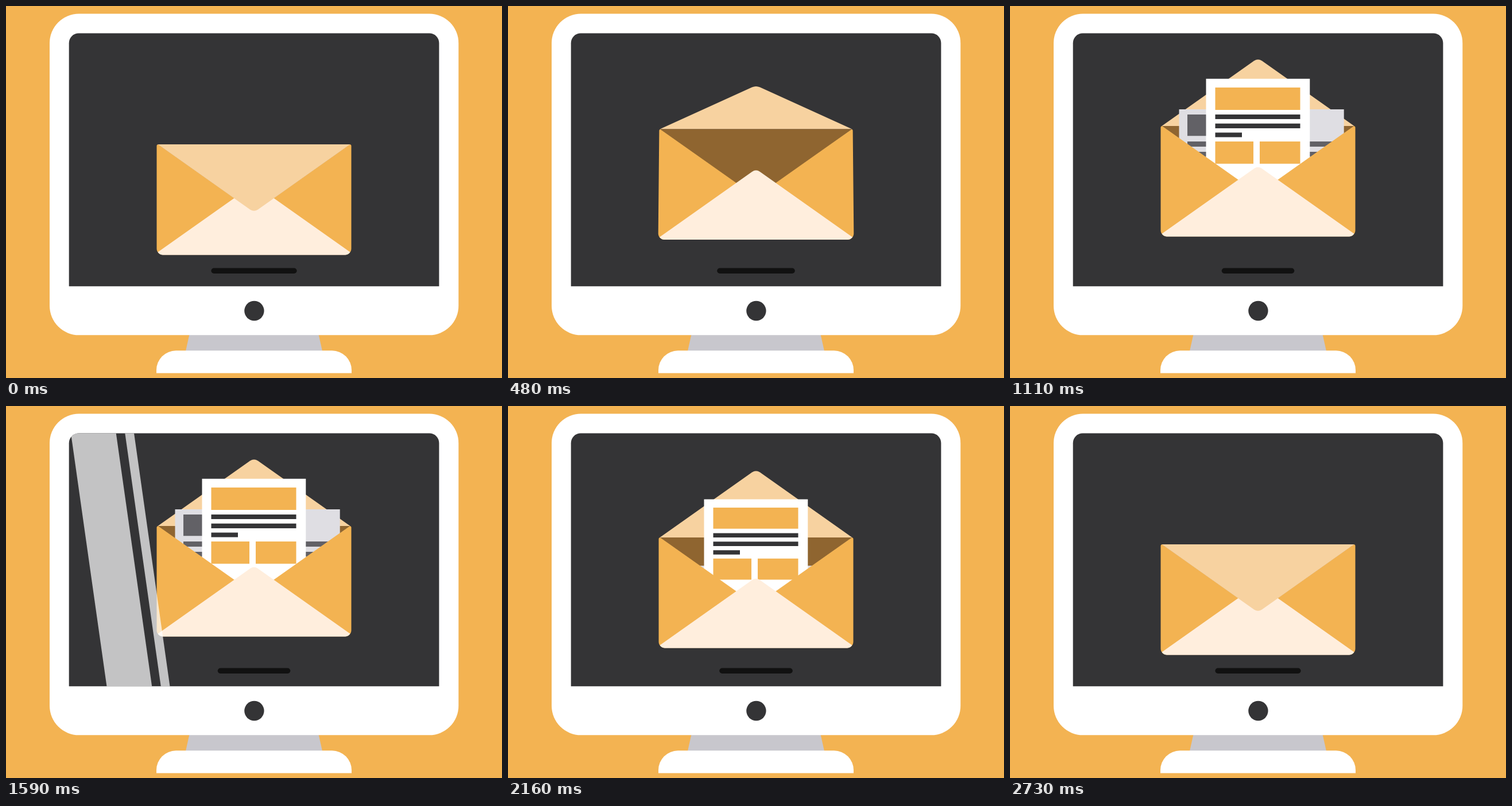
Recreate the animation shown at these times as an HTML page with a canvas. Size 864 px wide and 648 px high, loop 3.18 s.

```html
<!DOCTYPE html>
<html lang="en">
<head>
<meta charset="utf-8">
<title>Mail on a desktop screen</title>
<style>
  html, body { margin: 0; width: 100%; height: 100%; overflow: hidden; background: #f3b352; }
  canvas { display: block; width: 100vw; height: 100vh; }
</style>
</head>
<body>
<canvas id="stage" width="864" height="648"></canvas>
<script>
const ctx = document.getElementById('stage').getContext('2d');
const LOOP = 3180, STEP = 30;
const CX = 432, HALF = 169.5, BODY = 192.5, SLOPE = 0.707;
const GOLD = '#f3b352', DARK = '#343436', FLAP = '#f7d2a0', CREAM = '#ffeedd',
      BROWN = '#8f6530', PAPER = '#dfdee3', GREY = '#626166';

const clamp = v => Math.min(1, Math.max(0, v));
const span = (t, a, b) => clamp((t - a) / (b - a));
const sine = u => (1 - Math.cos(Math.PI * u)) / 2;
const ease = (t, a, b) => sine(span(t, a, b));
const mix = (a, b, u) => a + (b - a) * u;
const backOut = u => 1 + 1.8 * (u - 1) ** 3 + 0.8 * (u - 1) ** 2;

function box(color, x1, y1, x2, y2, radii = 0) {
  ctx.fillStyle = color;
  ctx.beginPath();
  ctx.roundRect(x1, y1, x2 - x1, y2 - y1, radii);
  ctx.fill();
}

function poly(color, points) {
  ctx.fillStyle = color;
  ctx.beginPath();
  points.forEach(([x, y]) => ctx.lineTo(x, y));
  ctx.closePath();
  ctx.fill();
}

// Triangle on a base line with a rounded tip in the middle
function tipped(color, half, base, tip) {
  ctx.fillStyle = color;
  ctx.beginPath();
  ctx.moveTo(CX - half, base);
  ctx.arcTo(CX, tip, CX + half, base, 12);
  ctx.lineTo(CX + half, base);
  ctx.closePath();
  ctx.fill();
}

function drawMonitor() {
  box(GOLD, 0, 0, 864, 648);
  poly('#c8c7cd', [[319.5, 572], [544.5, 572], [551, 601], [313, 601]]);
  box('#fff', 262, 600.3, 602, 639.5, [34, 34, 0, 0]);
  box('#fff', 76, 13.5, 788.3, 573.3, 51);
  box(DARK, 109.7, 47.5, 754.4, 488.3, [17, 17, 0, 0]);
  ctx.fillStyle = DARK;
  ctx.beginPath();
  ctx.arc(432.4, 531, 17.2, 0, 7);
  ctx.fill();
}

// The sheets stretch upward from a line near the envelope's bottom
function sheet(scale, draw) {
  if (scale <= 0.05) return;
  const foot = 208;
  ctx.save();
  ctx.beginPath();
  ctx.rect(CX - 160, -200, 320, 380);
  ctx.clip();
  ctx.translate(0, foot);
  ctx.scale(1, scale);
  ctx.translate(0, -foot);
  draw();
  ctx.restore();
}

function backSheet() {
  box(PAPER, 294.5, -29, 581.7, 208);
  box(GREY, 309, -20, 380, 17.3);
  box(GREY, 309, 27, 567, 36);
  box(GREY, 309, 45, 567, 53.5);
}

function frontSheet() {
  box('#fff', 341.5, -82.3, 522.3, 208);
  box(GOLD, 357.5, -67, 505.5, -28);
  box(DARK, 357.5, -20, 505.5, -12);
  box(DARK, 357.5, -4.3, 505.5, 3.9);
  box(DARK, 357.5, 11.5, 404, 19.4);
  box(GOLD, 357.5, 27, 424, 65.7);
  box(GOLD, 435, 27, 505.5, 65.7);
}

function bodyPath(tilt) {
  const top = HALF - tilt, low = HALF + tilt;
  ctx.beginPath();
  ctx.moveTo(CX, 0);
  ctx.arcTo(CX + top, 0, CX + low, BODY, 3);
  ctx.arcTo(CX + low, BODY, CX, BODY, 11);
  ctx.arcTo(CX - low, BODY, CX - top, 0, 11);
  ctx.arcTo(CX - top, 0, CX, 0, 3);
  ctx.closePath();
}

function drawFlap(scale) {
  ctx.save();
  ctx.scale(1, scale);
  tipped(FLAP, 167.5, 0, 118.3);
  ctx.restore();
}

function drawEnvelope(pose) {
  const flap = 1 - 2 * pose.open;
  ctx.save();
  ctx.translate(0, pose.top);
  if (flap < 0) drawFlap(flap);
  poly(BROWN, [[CX - 167, 0], [CX + 167, 0], [CX + 24, 102], [CX - 24, 102]]);
  sheet(pose.back, backSheet);
  sheet(pose.front, frontSheet);

  ctx.save();
  bodyPath(pose.tilt);
  ctx.clip();
  const reach = 167 * SLOPE;
  for (const side of [-1, 1]) {
    poly(GOLD, [[CX + side * 180, 0], [CX + side * 167, 0], [CX, reach],
                [CX, BODY], [CX + side * 180, BODY]]);
  }
  tipped(CREAM, 190, 69.3 + 190 * SLOPE, 69.3);
  ctx.fillStyle = CREAM;
  ctx.fillRect(CX - 174, 69.3 + 174 * SLOPE, 348, 20);
  ctx.restore();

  if (flap > 0) drawFlap(flap);
  ctx.restore();
}

// Short strokes that shoot out beside the opening
function drawSparks(t) {
  const head = ease(t, 780, 960), tail = ease(t, 900, 1110);
  if (head <= tail) return;
  ctx.strokeStyle = FLAP;
  ctx.lineWidth = 3;
  ctx.lineCap = 'round';
  for (const [x, y, endY] of [[246, 200, 183], [246, 210, 210]]) {
    for (const flip of [x => x, x => 874 - x]) {
      ctx.beginPath();
      ctx.moveTo(flip(mix(x, 204, tail)), mix(y, endY, tail));
      ctx.lineTo(flip(mix(x, 204, head)), mix(y, endY, head));
      ctx.stroke();
    }
  }
}

function drawGlare(t) {
  if (t <= 1440 || t >= 1950) return;
  const x = mix(-65, 831, ease(t, 1440, 1950));
  ctx.save();
  ctx.beginPath();
  ctx.roundRect(109.7, 47.5, 644.7, 440.8, [17, 17, 0, 0]);
  ctx.clip();
  for (const [a, b] of [[0, 78.7], [94.3, 110]]) {
    poly('rgba(255,255,255,0.705)',
      [[x + a, 47.5], [x + b, 47.5], [x + b + 62.5, 488.5], [x + a + 62.5, 488.5]]);
  }
  ctx.restore();
}

function openAmount(t) {
  if (t < 540) {
    const u = span(t, 290, 540);
    return 1.025 * mix(u, sine(u), 0.4);
  }
  if (t < 1400) return 1 + 0.025 * (1 - ease(t, 540, 660));
  return 1 - ease(t, 2370, 2670);
}

function poseAt(t) {
  const lift = ease(t, 0, 660) - ease(t, 1860, 2377);
  const open = openAmount(t);
  return {
    top: 241 - 32 * lift,
    open,
    tilt: 1.7 * Math.sin(Math.PI * clamp(open)),
    front: t < 1400 ? (t > 555 ? backOut(span(t, 555, 930)) : 0) : 1 - ease(t, 2100, 2500),
    back: t < 1400 ? (t > 640 ? backOut(span(t, 640, 1020)) : 0) : 1 - ease(t, 2004, 2404),
    bar: 74.6 - 11.3 * (ease(t, 0, 850) - ease(t, 2070, 2730))
  };
}

function render(t) {
  const pose = poseAt(t);
  drawMonitor();
  box('#111', CX - pose.bar, 456.5, CX + pose.bar, 466, 4.75);
  drawEnvelope(pose);
  drawSparks(t);
  drawGlare(t);
}

const start = performance.now();
function tick() {
  const t = (performance.now() - start) % LOOP;
  render(Math.floor(t / STEP) * STEP);
  requestAnimationFrame(tick);
}
tick();
</script>
</body>
</html>
```
